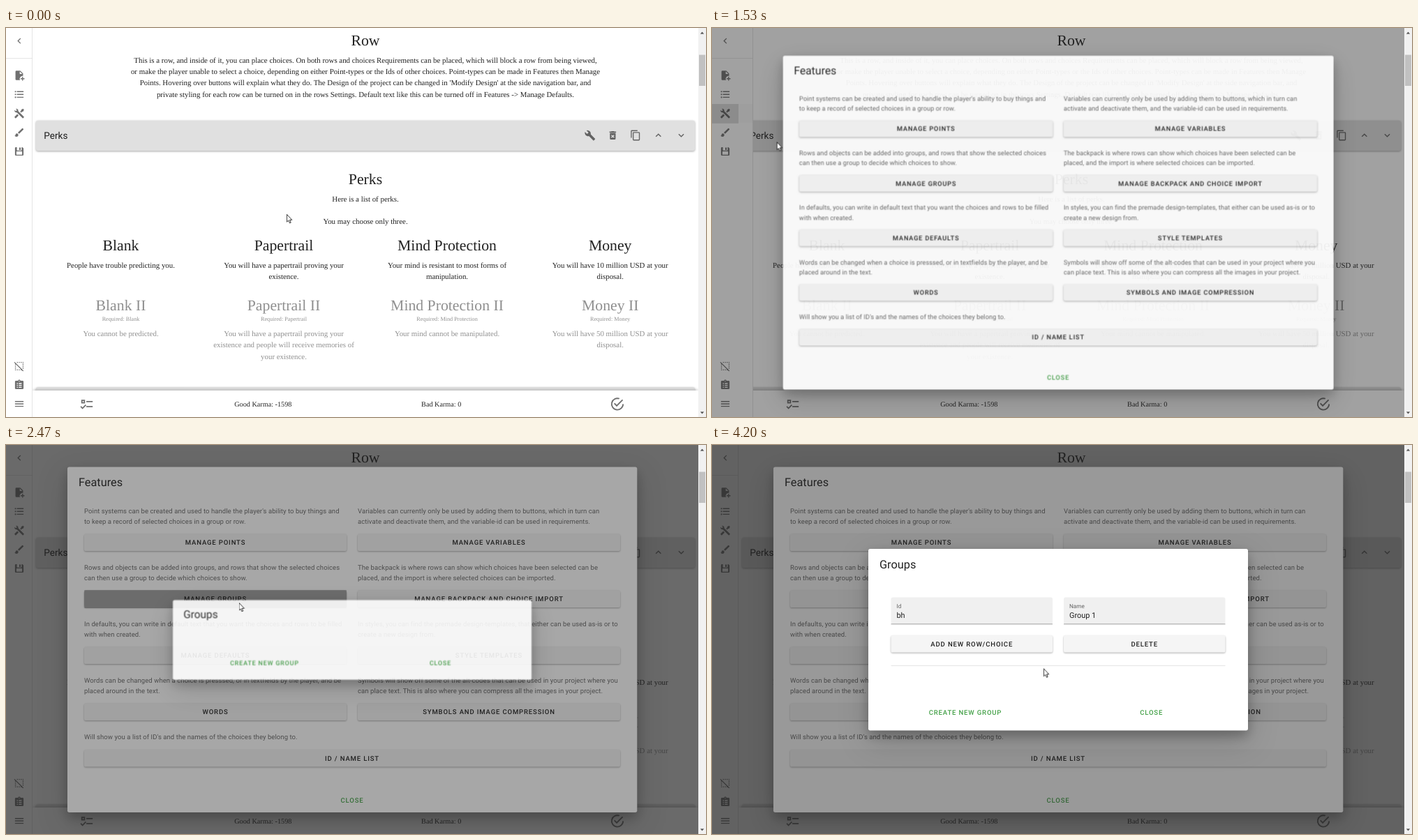
These frames come from a looping animation (1003 by 558 pixels, 4.94 s). An HTML page:

```html
<!DOCTYPE html>
<html lang="en">
<head>
<meta charset="utf-8">
<title>Feature dialogs</title>
<style>
html, body { margin: 0; width: 100%; height: 100%; overflow: hidden; background: #fff; }
svg { display: block; }
#stage { width: 1003px; height: 558px; }
text { font: 9.52px Roboto, sans-serif; fill: rgba(0,0,0,.87); text-rendering: geometricPrecision; white-space: pre; }
.mid { text-anchor: middle; }
.serif { font-family: "Liberation Serif", serif; font-size: 10.88px; }
.title { font-size: 21.76px; }
.small { font-size: 8.16px; }
.karma { font-size: 10.2px; }
.bar { font-size: 13.6px; }
.head { font-size: 16.32px; }
.value { font-size: 10.88px; }
.copy { fill: rgba(0,0,0,.6); letter-spacing: .0071em; }
.hint { fill: rgba(0,0,0,.6); font-size: 8.16px; }
.caps { font-weight: 500; letter-spacing: .0893em; }
.green { fill: #43a047; }
.icon { fill: rgba(0,0,0,.56); fill-rule: evenodd; }
.off { opacity: .5; }
.button { fill: #f5f5f5; filter: drop-shadow(0 1.2px 1.1px rgba(0,0,0,.32)); }
.strip { fill: #e0e0e0; filter: drop-shadow(0 1.5px 1.5px rgba(0,0,0,.35)); }
.foot { fill: #fff; filter: drop-shadow(0 -1px 2px rgba(0,0,0,.2)); }
.sheet { fill: #fff; filter: drop-shadow(0 7px 8px rgba(0,0,0,.24)) drop-shadow(0 13px 20px rgba(0,0,0,.18)); }
.dialog { transform-origin: 496px 279.5px; }
.label { position: absolute; left: 49px; right: 11px; height: 27px; line-height: 27px; overflow: hidden;
  white-space: nowrap; text-overflow: ellipsis; text-align: center; color: rgba(0,0,0,.87);
  font: 500 8.84px/27px Roboto, sans-serif; text-rendering: geometricPrecision; }
.labels { position: relative; height: 558px; }
</style>
</head>
<body>
<script>
const LOOP = 4940, STEP = 1000 / 15;

const dot = y => `M4 ${y - 1.5}a1.5 1.5 0 0 1 0 3 1.5 1.5 0 0 1 0-3`;
const ICONS = {
  left: 'M15.4 16.6L10.8 12 15.4 7.4 14 6 8 12 14 18Z',
  up: 'M7.4 15.4L12 10.8 16.6 15.4 18 14 12 8 6 14Z',
  down: 'M7.4 8.6L12 13.2 16.6 8.6 18 10 12 16 6 10Z',
  file: 'M14 2H6A2 2 0 0 0 4 4V20A2 2 0 0 0 6 22H13.8A6 6 0 0 1 20 13.1V8L14 2M13 9V3.5L18.5 9H13M23 20H20V23H18V20H15V18H18V15H20V18H23Z',
  list: 'M7 5H21V7H7M7 11H21V13H7M7 17H21V19H7Z' + dot(6) + dot(12) + dot(18),
  tools: 'M21.7 20.3L20.3 21.7A1 1 0 0 1 18.9 21.7L7 9.85A4 4 0 0 1 2.2 4.7L4.8 7.2 7.2 4.8 4.7 2.2A4 4 0 0 1 9.85 7L21.7 18.9A1 1 0 0 1 21.7 20.3M2.3 18.9A1 1 0 0 0 2.3 20.3L3.7 21.7A1 1 0 0 0 5.1 21.7L10.6 16.25 7.8 13.4M20 2L16 4V6L13.8 8.2 15.8 10.2 18 8H20L22 4Z',
  brush: 'M20.7 4.6L19.4 3.3A1 1 0 0 0 18 3.3L9 12.25 11.75 15 20.7 6A1 1 0 0 0 20.7 4.6M7 14A3 3 0 0 0 4 17C4 18.3 2.8 19 2 19A5 5 0 0 0 6 21 4 4 0 0 0 10 17 3 3 0 0 0 7 14Z',
  floppy: 'M5 3A2 2 0 0 0 3 5V19A2 2 0 0 0 5 21H19A2 2 0 0 0 21 19V5.5L18.5 3H17V9A1 1 0 0 1 16 10H8A1 1 0 0 1 7 9V3H5M12 4V9H15V4H12M7 12H17A1 1 0 0 1 18 13V19H6V13A1 1 0 0 1 7 12Z',
  unselect: 'M1 4.3L2.3 3 21 21.7 19.7 23 17 20.3V21H15V19H15.7L5 8.3V9H3V7H3.7ZM20 3A1 1 0 0 1 21 4V5H19V3M15 5V3H17V5M11 5V3H13V5M7 5V3H9V5M11 21V19H13V21M7 21V19H9V21M4 21A1 1 0 0 1 3 20V19H5V21M3 15H5V17H3M21 15V17H19V15M3 11H5V13H3M21 11V13H19V11M21 7V9H19V7Z',
  clipboard: 'M19 3H14.8A3 3 0 0 0 9.2 3H5A2 2 0 0 0 3 5V19A2 2 0 0 0 5 21H19A2 2 0 0 0 21 19V5A2 2 0 0 0 19 3M12 3A1 1 0 0 1 12 5 1 1 0 0 1 12 3M7 8H9V10H7M11 8H17V10H11M7 12H9V14H7M11 12H17V14H11M7 16H9V18H7M11 16H17V18H11Z',
  menu: 'M3 6H21V8H3M3 11H21V13H3M3 16H21V18H3Z',
  wrench: 'M22.7 19L13.6 9.9A7 7 0 0 0 4.7 1.7L9 6 6 9 1.6 4.7A7 7 0 0 0 9.8 13.6L18.9 22.7A1 1 0 0 0 20.3 22.7L22.6 20.4A1 1 0 0 0 22.7 19Z',
  bin: 'M6 19A2 2 0 0 0 8 21H16A2 2 0 0 0 18 19V7H6V19M8.5 11.9L9.9 10.5 12 12.6 14.1 10.5 15.5 11.9 13.4 14 15.5 16.1 14.1 17.5 12 15.4 9.9 17.5 8.5 16.1 10.6 14ZM15.5 4L14.5 3H9.5L8.5 4H5V6H19V4Z',
  copy: 'M19 21H8V7H19M19 5H8A2 2 0 0 0 6 7V21A2 2 0 0 0 8 23H19A2 2 0 0 0 21 21V7A2 2 0 0 0 19 5M16 1H4A2 2 0 0 0 2 3V17H4V3H16Z',
  checks: 'M3 5H9V11H3V5M5 7V9H7V7H5M11 7H21V9H11M11 15H21V17H11M5 20L1.5 16.5 2.9 15.1 5 17.2 9.6 12.6 11 14Z',
  done: 'M20 12A8 8 0 1 1 14.2 4.3L15.8 2.7A10 10 0 1 0 22 12M7.9 10.1L6.5 11.5 11 16 21 6 19.6 4.6 11 13.2Z'
};

// Markup helpers; y is the vertical centre of the line.
const text = (x, y, str, cls) => `<text x="${x}" y="${y}" dy=".34em" class="${cls}">${str}</text>`;
const lines = (x, y, gap, str, cls) => str.split('|').map((s, i) => text(x, y + i * gap, s, cls)).join('');
const rect = (x, y, w, h, attrs = '') => `<rect x="${x}" y="${y}" width="${w}" height="${h}" ${attrs}/>`;
const icon = (name, x, y, size = 16.32) =>
  `<path class="icon" d="${ICONS[name]}" transform="translate(${x - size / 2} ${y - size / 2}) scale(${size / 24})"/>`;
const button = (x, w, y, str) =>
  rect(x, y - 12.4, w, 24.5, 'rx="2.7" class="button"') + text(x + w / 2, y, str, 'caps mid');
const ripple = (id, x, y, w, h, fill) =>
  `<svg x="${x}" y="${y}" width="${w}" height="${h}" viewBox="${x} ${y} ${w} ${h}"><circle id="${id}" fill="${fill}"/></svg>`;

const perk = (x, name, now, next) =>
  text(x, 312, name, 'serif title mid') + lines(x, 340.5, 16.3, now, 'serif mid') +
  `<g class="off">${text(x, 398, name + ' II', 'serif title mid')}${text(x, 417.5, 'Required: ' + name, 'serif small mid')}${lines(x, 438.3, 16.3, next, 'serif mid')}</g>`;

const page = rect(0, 0, 1003, 558, 'fill="#fff"') +
  text(515, 18, 'Row', 'serif title mid') +
  lines(515, 46, 16.32, "This is a row, and inside of it, you can place choices. On both rows and choices Requirements can be placed, which will block a row from being viewed,|or make the player unable to select a choice, depending on either Point-types or the Ids of other choices. Point-types can be made in Features then Manage|Points. Hovering over buttons will explain what they do. The Design of the project can be changed in 'Modify Design' at the side navigation bar, and|private styling for each row can be turned on in the rows Settings. Default text like this can be turned off in Features -&gt; Manage Defaults.", 'serif mid') +
  rect(43, 132.8, 944, 43.2, 'rx="2.7" class="strip"') + text(54.3, 154, 'Perks', 'bar') +
  ['wrench', 'bin', 'copy', 'up', 'down'].map((n, i) => icon(n, 836.7 + i * 32.7, 154)).join('') +
  text(515, 216.5, 'Perks', 'serif title mid') +
  text(515, 245, 'Here is a list of perks.', 'serif mid') +
  text(515, 277.8, 'You may choose only three.', 'serif mid') +
  perk(164.5, 'Blank', 'People have trouble predicting you.', 'You cannot be predicted.') +
  perk(398, 'Papertrail', 'You will have a papertrail proving your|existence.', 'You will have a papertrail proving your|existence and people will receive memories of|your existence.') +
  perk(632, 'Mind Protection', 'Your mind is resistant to most forms of|manipulation.', 'Your mind cannot be manipulated.') +
  perk(865.7, 'Money', 'You will have 10 million USD at your|disposal.', 'You will have 50 million USD at your|disposal.') +
  rect(43, 515.3, 944, 43, 'rx="2.7" class="strip"') +
  rect(38, 520, 954, 40, 'class="foot"') +
  icon('checks', 116, 539.5, 21.8) + icon('done', 876, 539.5, 21.8) +
  text(368.3, 539.5, 'Good Karma: -1598', 'serif karma mid') +
  text(623.7, 539.5, 'Bad Karma: 0', 'serif karma mid');

const MENU = [
  ['left', 18.5, 'Return To Menu'], ['file', 68, 'Create New Row'], ['list', 95.3, 'Open Row List'],
  ['tools', 122.6, 'Open Features'], ['brush', 149.8, 'Modify Design'], ['floppy', 177, 'Save/Load Project'],
  ['unselect', 485, 'Clean Selected Choices'], ['clipboard', 512, 'See ID/Title List'], ['menu', 539.2, 'Use Alternate Menu']
];
const drawer = rect(0, 0, 38, 558, 'class="wide" fill="#fff"') +
  rect(0, 43.2, 38, .7, 'class="wide" fill="#dcdcdc"') +
  rect(0, 109, 38, 27.2, 'class="wide" id="rowHover"') +
  `<svg class="wide" x="0" y="109" width="38" height="27.2"><circle id="rowRipple"/></svg>` +
  rect(-.7, 0, .7, 558, 'id="edge" fill="#d8d8d8"') +
  MENU.map(([n, y]) => icon(n, 19, y)).join('') +
  `<foreignObject class="wide" x="0" y="0" width="38" height="558"><div class="labels">${
    MENU.map(([, y, s]) => `<div class="label" style="top:${y - 13.5}px">${s}</div>`).join('')}</div></foreignObject>`;

const feature = (x, y, note, name) => lines(x, y, 14.75, note, 'copy') + button(x, 376, y + 45, name);
const features = rect(88, 31.5, 816.3, 495.5, 'rx="2.7" class="sheet"') + text(104, 53.5, 'Features', 'head') +
  feature(112, 95, "Point systems can be created and used to handle the player's ability to buy things and|to keep a record of selected choices in a group or row.", 'MANAGE POINTS') +
  feature(504, 95, 'Variables can currently only be used by adding them to buttons, which in turn can|activate and deactivate them, and the variable-id can be used in requirements.', 'MANAGE VARIABLES') +
  feature(112, 176, 'Rows and objects can be added into groups, and rows that show the selected choices|can then use a group to decide which choices to show.', 'MANAGE GROUPS') +
  feature(504, 176, 'The backpack is where rows can show which choices have been selected can be|placed, and the import is where selected choices can be imported.', 'MANAGE BACKPACK AND CHOICE IMPORT') +
  feature(112, 257, 'In defaults, you can write in default text that you want the choices and rows to be filled|with when created.', 'MANAGE DEFAULTS') +
  feature(504, 257, 'In styles, you can find the premade design-templates, that either can be used as-is or to|create a new design from.', 'STYLE TEMPLATES') +
  feature(112, 338, 'Words can be changed when a choice is presssed, or in textfields by the player, and be|placed around in the text.', 'WORDS') +
  feature(504, 338, 'Symbols will show off some of the alt-codes that can be used in your project where you|can place text. This is also where you can compress all the images in your project.', 'SYMBOLS AND IMAGE COMPRESSION') +
  text(112, 419, "Will show you a list of ID's and the names of the choices they belong to.", 'copy') +
  button(112, 768, 449.5, 'ID / NAME LIST') +
  text(496, 509.5, 'CLOSE', 'caps mid green') +
  rect(112, 208.6, 376, 24.5, 'rx="2.7" id="groupsHover"') + ripple('groupsRipple', 112, 208.6, 376, 24.5, '#000');

const field = (x, label, value) => rect(x, 218.5, 231.5, 38.5, 'rx="2.7" fill="#f0f0f0"') +
  rect(x, 256.5, 231.5, .8, 'fill="#8c8c8c"') + text(x + 8, 231.5, label, 'hint') + text(x + 8, 244.3, value, 'value');
const groups = rect(224, 149, 544, 260.5, 'rx="2.7" class="sheet" id="groupSheet"') +
  `<g id="groupHead">${text(240, 171, 'Groups', 'head')}</g>` +
  `<g id="groupForm">${field(256.5, 'Id', 'bh')}${field(504, 'Name', 'Group 1')}${
    button(256.5, 231.5, 285.5, 'ADD NEW ROW/CHOICE')}${button(504, 231.5, 285.5, 'DELETE')}${
    rect(256.5, 316.3, 479, .8, 'fill="#dcdcdc"')}</g>` +
  `<g id="groupFoot">${rect(238, 371.7, 250, 24.5, 'rx="2.7" fill="#43a047" id="createHover"')}${
    ripple('createRipple', 238, 371.7, 250, 24.5, '#43a047')}${
    text(363, 384, 'CREATE NEW GROUP', 'caps mid green')}${text(629.7, 384, 'CLOSE', 'caps mid green')}</g>`;

const scrollbar = rect(992, 0, 11, 558, 'fill="#f1f1f1"') + rect(993, 38.5, 9, 44.5, 'fill="#c1c1c1"') +
  '<path d="M994.8 8.6L997.5 5.6 1000.2 8.6ZM994.8 550.4L997.5 553.4 1000.2 550.4Z" fill="#505050"/>';
const cursor = '<g id="cursor" fill="#fff" stroke="#000" stroke-width=".8" stroke-linejoin="round">' +
  '<path id="arrow" d="M.4 .4V11.2L2.8 9 4.4 12.8 6.2 12.1 4.6 8.3H7.8Z"/>' +
  '<path id="hand" transform="translate(-2 1)" d="M3.5 7.8V1.3A1 1 0 0 1 5.6 1.3V5.2L10 6Q11.7 6.4 11.5 8L10.6 13H5L1 8.9Q.3 7.6 1.4 7.2Z"/></g>';
const scrim = id => rect(0, 0, 992, 558, `id="${id}" fill="#212121"`);

document.body.innerHTML = `<svg id="stage" viewBox="0 0 1003 558">${page}${drawer}${scrim('scrim1')}
<g id="features" class="dialog">${features}</g>${scrim('scrim2')}
<g id="groups" class="dialog">${groups}</g>${scrollbar}${cursor}</svg>`;

// Each step is [time, properties, easing towards the next step].
const animations = [];
function track(selector, ...steps) {
  const frames = steps.map(([t, props, easing = 'linear']) => ({ ...props, offset: t / LOOP, easing }));
  const all = [{ ...steps[0][1], offset: 0 }, ...frames, { ...steps.at(-1)[1], offset: 1 }];
  for (const el of document.querySelectorAll(selector)) {
    const animation = el.animate(all, { duration: LOOP, fill: 'both' });
    animation.pause();
    animations.push(animation);
  }
}
const STANDARD = 'cubic-bezier(.4,0,.2,1)', SWIFT = 'cubic-bezier(.25,.8,.25,1)', FADE = 'cubic-bezier(.25,.8,.5,1)';
const alpha = opacity => ({ opacity });
const shift = (x, y) => ({ transform: `translate(${x}px, ${y}px)` });
const disc = (cx, cy, r) => ({ cx: cx + 'px', cy: cy + 'px', r: r + 'px' });
const flip = (selector, t, before, after) => track(selector, [0, before, 'step-end'], [t, after]);

function openDialog(dialog, scrimId, start) {
  track(dialog, [start, { transform: 'scale(.5)', opacity: 0 }, SWIFT], [start + 300, { transform: 'scale(1)', opacity: 1 }]);
  track(scrimId, [start - 20, alpha(0), FADE], [start + 280, alpha(.46)]);
}
function press(selector, start, from, to, strength, release) {
  track(selector, [start, from, STANDARD], [start + 250, to]);
  track(selector, [0, alpha(0), 'step-end'], [start, alpha(strength)], [release, alpha(strength)], [release + 220, alpha(0)]);
}

const drawerSteps = make => [[842, make(38), STANDARD], [1042, make(174)], [1420, make(174), STANDARD], [1620, make(38)]];
track('.wide', ...drawerSteps(w => ({ width: w + 'px' })));
track('#edge', ...drawerSteps(w => shift(w, 0)));
track('#rowHover', [790, alpha(0)], [930, alpha(.025)], [1340, alpha(.025)], [1400, alpha(.067)], [1600, alpha(0)]);
press('#rowRipple', 1360, disc(22, 18, 26.4), disc(87, 13.6, 88), .16, 1480);

flip('#scrim1', 1440, { x: '174px' }, { x: '0px' });
openDialog('#features', '#scrim1', 1385);
track('#groupsHover', [0, alpha(0), 'step-end'], [1710, alpha(.08), 'step-end'], [2230, alpha(.155)], [2450, alpha(.155)], [2700, alpha(0)]);
press('#groupsRipple', 2230, disc(334, 226, 56), disc(300, 221, 188.4), .25, 2480);

openDialog('#groups', '#scrim2', 2343);
track('#createHover', [0, alpha(0), 'step-end'], [3225, alpha(.08)], [3450, alpha(.08)], [3700, alpha(0)]);
press('#createRipple', 3225, disc(360, 391, 37.7), disc(363, 384, 125.6), .24, 3480);
const GROW = 3310;
flip('#groupSheet', GROW, { y: '219px', height: '121px' }, { y: '149px', height: '260.5px' });
flip('#groupHead', GROW, shift(0, 69.5), shift(0, 0));
flip('#groupFoot', GROW, shift(0, -69.5), shift(0, 0));
flip('#groupForm', GROW, alpha(0), alpha(1));

track('#cursor', ...[
  [200, 402, 267], [330, 372, 256], [600, 120, 162], [730, 49, 135], [800, 24, 127], [930, 22, 125],
  [1400, 22, 125], [1470, 50, 140], [1730, 225, 236], [1870, 265, 222], [2130, 333.5, 226],
  [2530, 333.5, 226], [2730, 332.5, 256], [2870, 340, 280], [3130, 360, 323], [3200, 360, 323],
  [3330, 360, 321], [3530, 360, 321], [3730, 411, 323], [4000, 455, 322], [4200, 475, 320.5]
].map(([t, x, y]) => [t, shift(x, y)]));
const shown = on => alpha(on ? 1 : 0);
for (const [id, pointing] of [['#hand', 1], ['#arrow', 0]])
  track(id, [0, shown(!pointing), 'step-end'], [780, shown(pointing), 'step-end'], [1380, shown(!pointing)]);

// The picture advances 15 times a second.
const begin = performance.now();
function draw(now) {
  const t = Math.max(0, now - begin) % LOOP;
  const stepped = Math.min(Math.floor((t + 5) / STEP) * STEP, LOOP - 1);
  for (const animation of animations) animation.currentTime = stepped;
  requestAnimationFrame(draw);
}
draw(begin);
</script>
</body>
</html>
```
